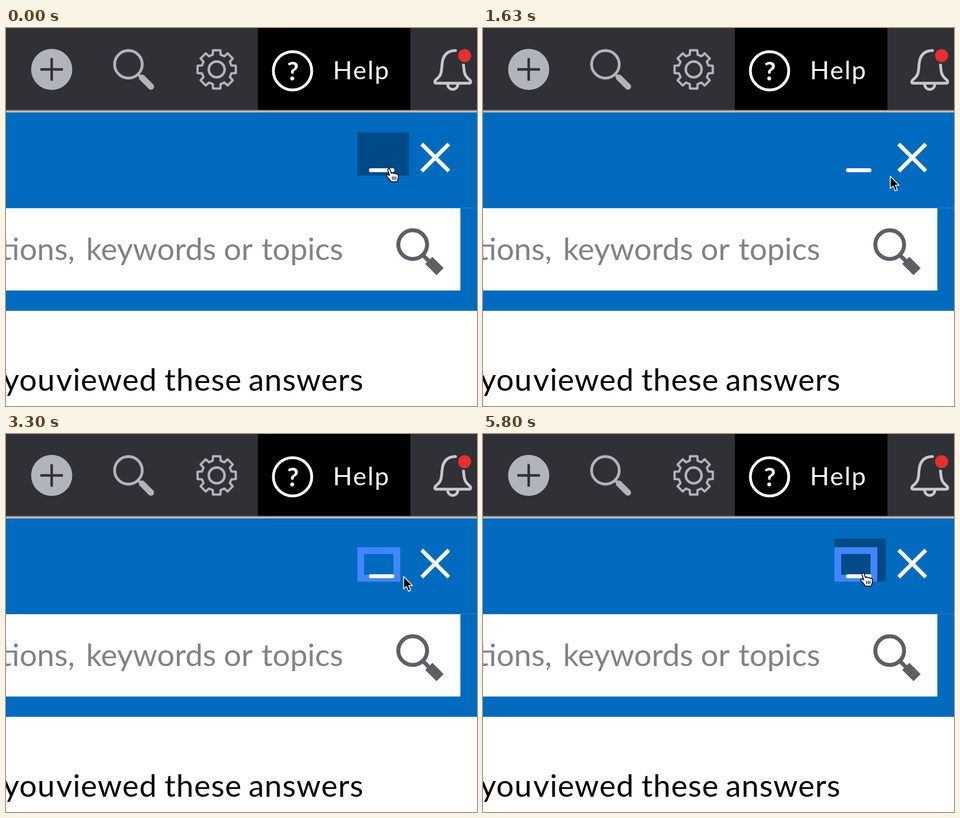
Recreate the animation shown at these times as an HTML page. Size 835 px wide and 671 px high, loop 5.83 s.

```html
<!DOCTYPE html>
<html lang="en">
<head>
<meta charset="utf-8">
<title>Help panel buttons</title>
<style>
  html, body { margin: 0; width: 100%; height: 100%; overflow: hidden; background: #fff; }
  svg { display: block; width: 835px; height: 671px; }
  text { font-family: Lato, "Open Sans", sans-serif; font-size: 55px; }
  .line { fill: none; stroke-linecap: round; stroke-linejoin: round; }
</style>
</head>
<body>
<svg viewBox="0 0 835 671">
  <!-- toolbar -->
  <rect width="835" height="146" fill="#303136"/>
  <rect x="446.5" width="270.5" height="146" fill="#000"/>
  <rect y="145.5" width="835" height="2" fill="#8d8d8f"/>
  <rect y="147" width="835" height="3" fill="#b9babc"/>

  <circle cx="81" cy="73.5" r="36.5" fill="#b1b4bd"/>
  <path d="M61 73.5H101M81 53.5V93.5" stroke="#303136" stroke-width="4.5"/>

  <g class="line" stroke="#b1b4bd">
    <circle cx="217" cy="64.500" r="24.5" stroke-width="5"/>
    <path d="M234 82L240 88" stroke-width="5"/>
    <path d="M241 88L257 104" stroke-width="11"/>
    <path id="gear" stroke-width="4"/>
    <circle cx="373.500" cy="73.500" r="14" stroke-width="4.500"/>
  </g>

  <circle cx="508" cy="76" r="34" fill="none" stroke="#fff" stroke-width="5"/>
  <text x="508.500" y="92.500" text-anchor="middle" fill="#fff" style="font-size:46px;font-weight:bold">?</text>
  <text x="579.500" y="90.500" fill="#fff" style="font-size:45px;letter-spacing:2px">Help</text>

  <g class="line" stroke="#c7c8cc" stroke-width="5">
    <path d="M797 40C780 40 774 51 773 65C772 81 771 85 762 92C759 95 760 98 763 98H821C824 98 825 95 822 92C813 85 812 80 811 64"/>
    <path d="M783 100C784 112 800 112 801 100"/>
  </g>
  <circle cx="813" cy="49" r="15" fill="#303136"/>
  <circle cx="813" cy="49" r="11.500" fill="#e6302d"/>

  <!-- panel -->
  <rect y="150" width="835" height="352" fill="#006bbe"/>
  <rect y="319" width="835" height="1" fill="#2a80c6"/>
  <rect y="320" width="805.500" height="146" fill="#fff"/>
  <text y="412" fill="#818188"><tspan x="-10">tions,</tspan><tspan x="142">keywords</tspan><tspan x="386">or</tspan><tspan x="453">topics</tspan></text>
  <g fill="none" stroke="#5e5f66">
    <circle cx="721" cy="384.500" r="25.500" stroke-width="7"/>
    <path d="M738 402L750 414" stroke-width="7"/>
    <path d="M749.500 412.500L769.500 432.500" stroke-width="18"/>
  </g>
  <text y="644" fill="#000" style="letter-spacing:1px"><tspan x="-5">you</tspan><tspan x="89">viewed</tspan><tspan x="281">these</tspan><tspan x="430">answers</tspan></text>

  <!-- window buttons -->
  <rect id="hover" y="185.500" width="91.500" height="76.500" fill="#004a87"/>
  <rect id="ring" y="207" width="64" height="49" fill="none" stroke="#4285ff" stroke-width="12"/>
  <rect x="643.500" y="249" width="45" height="7" rx="3" fill="#fff"/>
  <path d="M737 206L785 254M785 206L737 254" stroke="#fff" stroke-width="7"/>

  <g id="cursor" stroke-linejoin="round">
    <path id="arrow" d="M0 0V22L5 17.500L8.500 26L12.500 24.500L9 16H15.500Z" fill="#000" stroke="#fff" stroke-width="1.500"/>
    <g id="hand" transform="translate(-5 -1)" stroke="#000" stroke-width="1.500">
      <path d="M3 4C2 0 6 -1 7 3L9 9C11 7 13 8 13.500 9.500C15 8 17 9 17.500 10.500C19 9.500 21 10 21.500 13C22 18 20 20 19.500 24H9C7 20 3 17 1 14C0 11 3 10 6 13Z" fill="#fff"/>
      <path d="M11 14.500V20.500M14 14.500V20.500M17 14.500V20.500" stroke-width="1.300"/>
    </g>
  </g>
</svg>
<script>
const LOOP = 5830;
const $ = id => document.getElementById(id);
const [hover, ring, cursor, arrow, hand] = ['hover', 'ring', 'cursor', 'arrow', 'hand'].map($);

// Pointer tip: [time, x, y]
const path = [
  [0, 679, 250], [100, 681, 251], [600, 738, 290], [720, 744, 290], [1200, 759, 232],
  [1330, 759, 230], [1500, 755, 236], [1630, 722, 263], [1800, 678, 250], [2030, 664, 242],
  [2400, 673, 253], [2950, 692, 284], [3060, 694, 284], [3300, 705, 253], [3600, 748, 240],
  [3830, 747, 240], [4200, 748, 242], [4350, 746, 242], [4730, 702, 241], [5050, 678, 247],
  [5430, 674, 247], [LOOP, 674, 247]
];

// Button states: [start, button], '' for none
const hovers = [[0, 'min'], [230, ''], [950, 'close'], [1600, ''], [1720, 'min'], [2550, ''],
  [3330, 'min'], [3430, 'close'], [4600, 'min']];
const focus = [[0, ''], [1920, 'min'], [4000, 'close'], [5200, 'min']];
const pointers = [[0, 'hand'], [250, 'arrow'], [970, 'hand'], [1610, 'arrow'], [1740, 'hand'],
  [2560, 'arrow'], [3380, 'hand'], [4610, 'arrow'], [4800, 'hand']];
const left = { min: 623, close: 714 };

const stateAt = (list, t) => list.filter(s => s[0] <= t).pop()[1];
const show = (el, on) => el.style.display = on ? '' : 'none';

function place(el, button, inset) {
  show(el, button);
  if (button) el.setAttribute('x', left[button] + inset);
}

function tipAt(t) {
  const i = path.findIndex(p => p[0] > t);
  const a = path[i - 1], b = path[i];
  const u = (t - a[0]) / (b[0] - a[0]);
  const k = u * u * (3 - 2 * u);
  return [1, 2].map(n => Math.round(a[n] + (b[n] - a[n]) * k));
}

function gearPath() {
  const points = [];
  for (let i = 0; i < 8; i++) {
    for (const [r, turn] of [[27, -.26], [34.5, -.19], [34.5, .19], [27, .26]]) {
      const a = i * Math.PI / 4 + turn;
      points.push(`${373.5 + r * Math.sin(a)} ${73.5 - r * Math.cos(a)}`);
    }
  }
  return `M${points.join('L')}Z`;
}

function draw() {
  const t = performance.now() % LOOP;
  place(hover, stateAt(hovers, t), 0);
  place(ring, stateAt(focus, t), 6);
  const pointer = stateAt(pointers, t);
  show(arrow, pointer === 'arrow');
  show(hand, pointer === 'hand');
  cursor.setAttribute('transform', `translate(${tipAt(t).join(' ')})`);
  requestAnimationFrame(draw);
}

$('gear').setAttribute('d', gearPath());
draw();
</script>
</body>
</html>
```
